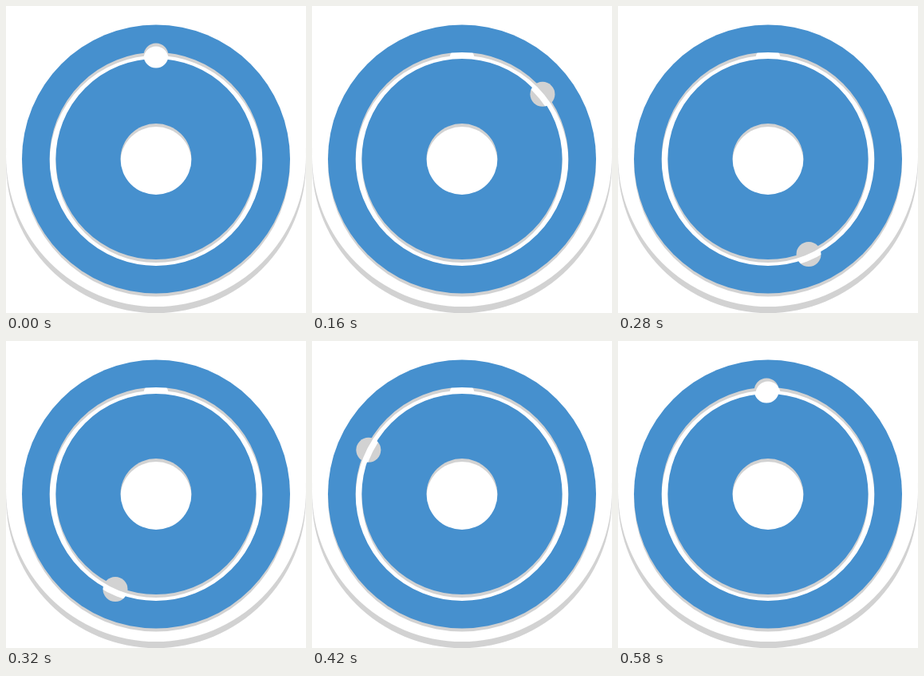
These frames come from a looping animation (376x384 px, 600 ms). An HTML page with a canvas:

```html
<!DOCTYPE html>
<html lang="en">
<head>
<meta charset="utf-8">
<title>Orbit loader</title>
<style>
  html, body { margin: 0; width: 100%; height: 100%; overflow: hidden; background: #fff; }
  canvas { display: block; }
</style>
</head>
<body>
<canvas id="stage" width="376" height="384"></canvas>
<script>
  const WIDTH = 376, HEIGHT = 384;
  const CENTER_X = 188, CENTER_Y = 191.5;
  const LOOP = 600, STEP = 20;
  const BLUE = '#4690ce', GREY = '#d2d2d2', WHITE = '#fff';
  const ORBIT = 129.5, SHADOW_DROP = 4;

  const stage = document.getElementById('stage').getContext('2d');

  function disc(ctx, x, y, radius, color) {
    ctx.fillStyle = color;
    ctx.beginPath();
    ctx.arc(x, y, radius, 0, 2 * Math.PI);
    ctx.fill();
  }

  // A round plate with the hub, the track and the travelling dot cut out.
  function makePlate(color) {
    const canvas = document.createElement('canvas');
    canvas.width = WIDTH;
    canvas.height = HEIGHT;
    const ctx = canvas.getContext('2d');

    return angle => {
      ctx.globalCompositeOperation = 'source-over';
      ctx.clearRect(0, 0, WIDTH, HEIGHT);
      disc(ctx, CENTER_X, CENTER_Y, 168, color);

      ctx.globalCompositeOperation = 'destination-out';
      disc(ctx, CENTER_X, CENTER_Y, 44.5, WHITE);
      ctx.lineWidth = 7.8;
      ctx.beginPath();
      ctx.arc(CENTER_X, CENTER_Y, ORBIT, 0, 2 * Math.PI);
      ctx.stroke();
      disc(ctx, CENTER_X + ORBIT * Math.sin(angle), CENTER_Y - ORBIT * Math.cos(angle), 15.5, WHITE);
      return canvas;
    };
  }

  const shadow = makePlate(GREY)(0);
  const drawPlate = makePlate(BLUE);

  const easeInOut = p => p < 0.5 ? 2 * p * p : 1 - 2 * (1 - p) ** 2;

  function render(time) {
    const step = Math.floor((time + 0.5) / STEP) % (LOOP / STEP);
    const angle = 2 * Math.PI * easeInOut(step * STEP / LOOP);

    stage.fillStyle = WHITE;
    stage.fillRect(0, 0, WIDTH, HEIGHT);
    disc(stage, CENTER_X, 196, 188, GREY);
    disc(stage, CENTER_X, 188, 188, WHITE);
    stage.drawImage(shadow, 0, SHADOW_DROP);
    stage.drawImage(drawPlate(angle), 0, 0);
  }

  const start = performance.now();
  function tick(now) {
    render(Math.max(0, now - start));
    requestAnimationFrame(tick);
  }
  render(0);
  requestAnimationFrame(tick);
</script>
</body>
</html>
```
